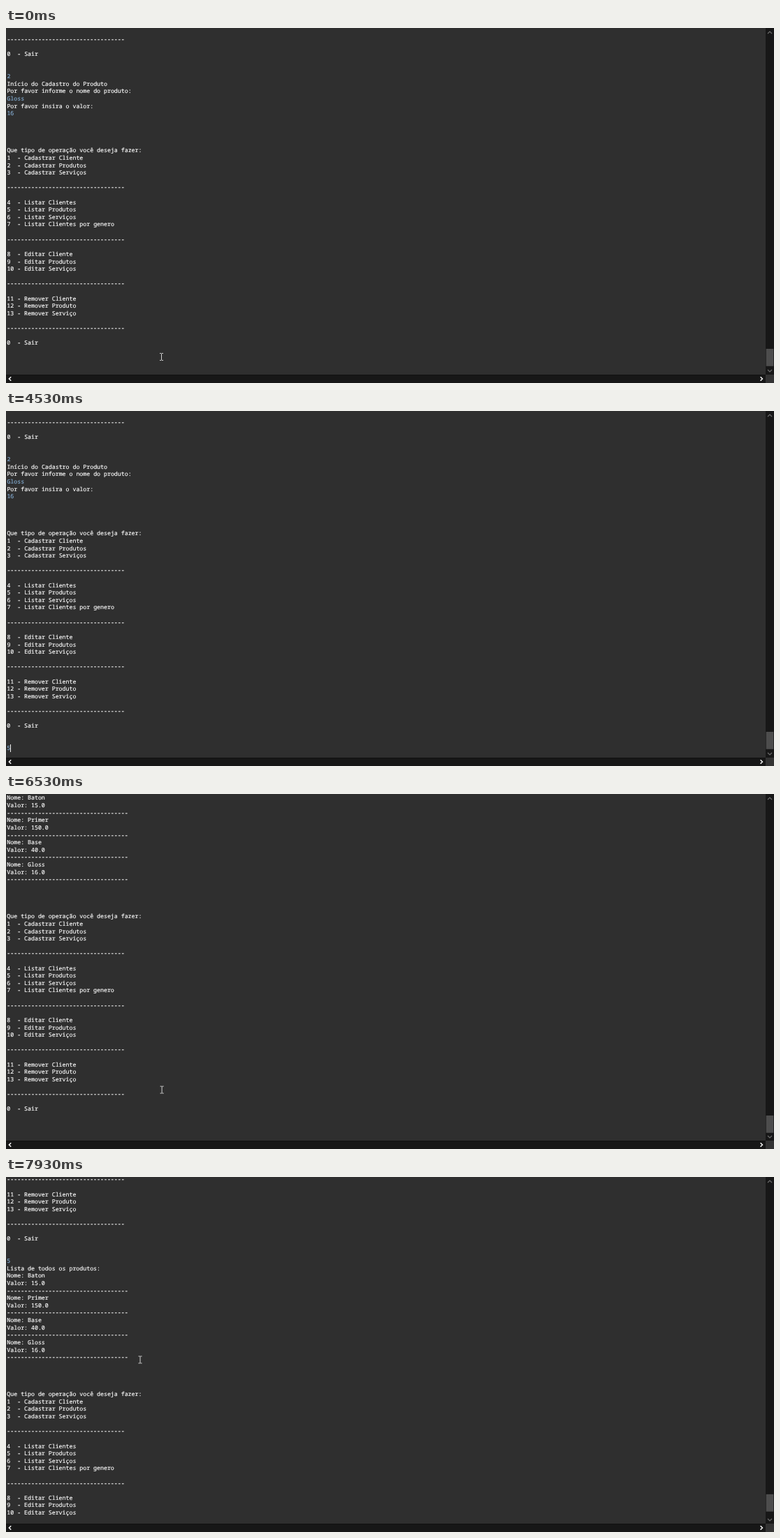
Recreate the animation shown at these times as an HTML page. Size 1099x509 px, loop 8000 ms.

```html
<!DOCTYPE html>
<html lang="pt">
<head>
<meta charset="utf-8">
<title>Console</title>
<style>
html, body { margin: 0; width: 100%; height: 100%; overflow: hidden; background: #2f2f2f; }
svg { display: block; width: 1099px; height: 509px; }
text {
  font: 8.257px "Noto Sans Mono", "DejaVu Sans Mono", monospace;
  fill: #fafafa;
  stroke: #fafafa;
  stroke-width: .18px;
  white-space: pre;
  text-rendering: geometricPrecision;
}
.in { fill: #83abd0; stroke: #83abd0; }
.arrow { fill: none; stroke: #6c6c6c; stroke-width: 1.2; }
.bright { stroke: #f4f4f4; stroke-width: 1.6; }
</style>
</head>
<body>
<svg viewBox="0 0 1099 509">
  <defs><clipPath id="view"><path d="M0 0H1087V497H0Z"/></clipPath></defs>
  <rect width="1099" height="509" fill="#2f2f2f"/>
  <g clip-path="url(#view)">
    <g id="doc"></g>
    <rect id="caret" width="1" height="11" fill="#f0f0f0"/>
    <path id="pointer" d="M-2.5 -5H-.7L0 -4.4L.7 -5H2.5M0 -4.4V4.4M-2.5 5H-.7L0 4.4L.7 5H2.5" fill="none" stroke="#d4d4d4"/>
  </g>
  <rect x="1087" width="12" height="497" fill="#171717"/>
  <rect id="thumb" x="1087.7" width="10.6" height="24.8" fill="#4d4d4d"/>
  <rect y="497" width="1087" height="12" fill="#171717"/>
  <rect y="497" width="1087" height="1" fill="#111"/>
  <rect x="1087" y="497" width="12" height="12" fill="#333"/>
  <path class="arrow" d="M1090 8L1093 5L1096 8M1090 490L1093 493L1096 490"/>
  <path class="arrow bright" d="M7.2 500.2L4.4 503L7.2 505.8M1079.6 500.2L1082.4 503L1079.6 505.8"/>
</svg>
<script>
// The console has 7 x 15 px cells, shown at a reduced scale.
const SCALE = 0.70767;
const ROW = 15 * SCALE, COL = 7 * SCALE, BASE = 12 * SCALE, LEFT = 2 * SCALE;
const FPS = 15, LOOP = 8000;
const $ = id => document.getElementById(id);
const doc = $('doc'), caret = $('caret'), pointer = $('pointer'), thumb = $('thumb');
const rule = '-'.repeat(34);

const menu = [
  'Que tipo de operação você deseja fazer:',
  '1  - Cadastrar Cliente', '2  - Cadastrar Produtos', '3  - Cadastrar Serviços',
  '', rule, '',
  '4  - Listar Clientes', '5  - Listar Produtos', '6  - Listar Serviços',
  '7  - Listar Clientes por genero',
  '', rule, '',
  '8  - Editar Cliente', '9  - Editar Produtos', '10 - Editar Serviços',
  '', rule, '',
  '11 - Remover Cliente', '12 - Remover Produto', '13 - Remover Serviço',
  '', rule, '',
  '0  - Sair'
];
const products = [['Baton', '15.0'], ['Primer', '150.0'], ['Base', '40.0'], ['Gloss', '16.0']];
const listing = products.flatMap(([name, price]) => ['Nome: ' + name, 'Valor: ' + price, rule + '-']);

// Lines starting with ">" were typed by the user.
const before = [
  '', rule, '', '0  - Sair', '', '',
  '>2', 'Início do Cadastro do Produto', 'Por favor informe o nome do produto:',
  '>Gloss', 'Por favor insira o valor:', '>16',
  '', '', '', '', ...menu
];
const after = ['Lista de todos os produtos:', ...listing, '', '', '', '', ...menu];

function addLines(lines, first) {
  const group = document.createElementNS('http://www.w3.org/2000/svg', 'g');
  lines.forEach((line, i) => {
    if (!line) return;
    const typed = line[0] === '>';
    const text = document.createElementNS(group.namespaceURI, 'text');
    text.setAttribute('x', LEFT);
    text.setAttribute('y', ((first + i) * ROW + BASE).toFixed(2));
    text.textContent = typed ? line.slice(1) : line;
    if (typed) text.setAttribute('class', 'in');
    group.append(text);
  });
  doc.append(group);
  return group;
}

addLines(before, 0);
const answer = addLines(['>5'], 45);
const result = addLines(after, 46);

// Times below count steps of 1/15 s.
const TYPE = 52, ENTER = 75, LISTED = 76, MOVE = 96, WHEEL = 97;
const blinks = [1, 10, 18, 26, 33, 42, 50, 60, 68, 105, 112, 119];
const path = [[0, 222.5, 471.5], [MOVE, 222.5, 471.5], [101, 224, 353],
  [104, 207.8, 337], [108, 209.5, 340], [119, 192, 262]];

// Four wheel notches of three rows; the first also drops the 12 px past the end.
function scrollAt(f) {
  if (f < LISTED) return 0;
  const notches = Math.max(0, Math.min(4, Math.floor((f - WHEEL) / 1.75)));
  return 47 * ROW - (notches && 12 * SCALE + notches * 3 * ROW);
}

function pointerAt(f) {
  const i = path.findIndex(p => p[0] > f);
  if (i < 0) return path[path.length - 1].slice(1);
  const a = path[i - 1], b = path[i], k = (f - a[0]) / (b[0] - a[0]);
  return [a[1] + (b[1] - a[1]) * k, a[2] + (b[2] - a[2]) * k];
}

const show = (el, on) => el.setAttribute('visibility', on ? 'visible' : 'hidden');

function draw(ms) {
  const f = Math.floor((ms % LOOP + 4) * FPS / 1000) % (LOOP * FPS / 1000);
  const top = scrollAt(f);

  show(answer, f >= TYPE);
  show(result, f >= ENTER);
  // The tiny turn keeps baselines from snapping to whole pixels.
  doc.setAttribute('transform', `translate(0 ${-top}) rotate(0.005)`);
  thumb.setAttribute('y', f < LISTED ? 460 : 461 - (47 * ROW - top) * 0.045);

  const row = f < TYPE ? 44 : f < ENTER ? 45 : 46;
  caret.setAttribute('x', Math.floor(LEFT + (row === 45 ? COL : 0)));
  caret.setAttribute('y', Math.round(row * ROW - top));
  show(caret, blinks.filter(b => b <= f).length % 2);

  const [x, y] = pointerAt(f);
  pointer.setAttribute('transform', `translate(${x} ${y})`);
  show(pointer, f < TYPE || f >= MOVE);
}

const start = performance.now();
function tick() {
  draw(performance.now() - start);
  requestAnimationFrame(tick);
}
tick();
</script>
</body>
</html>
```
